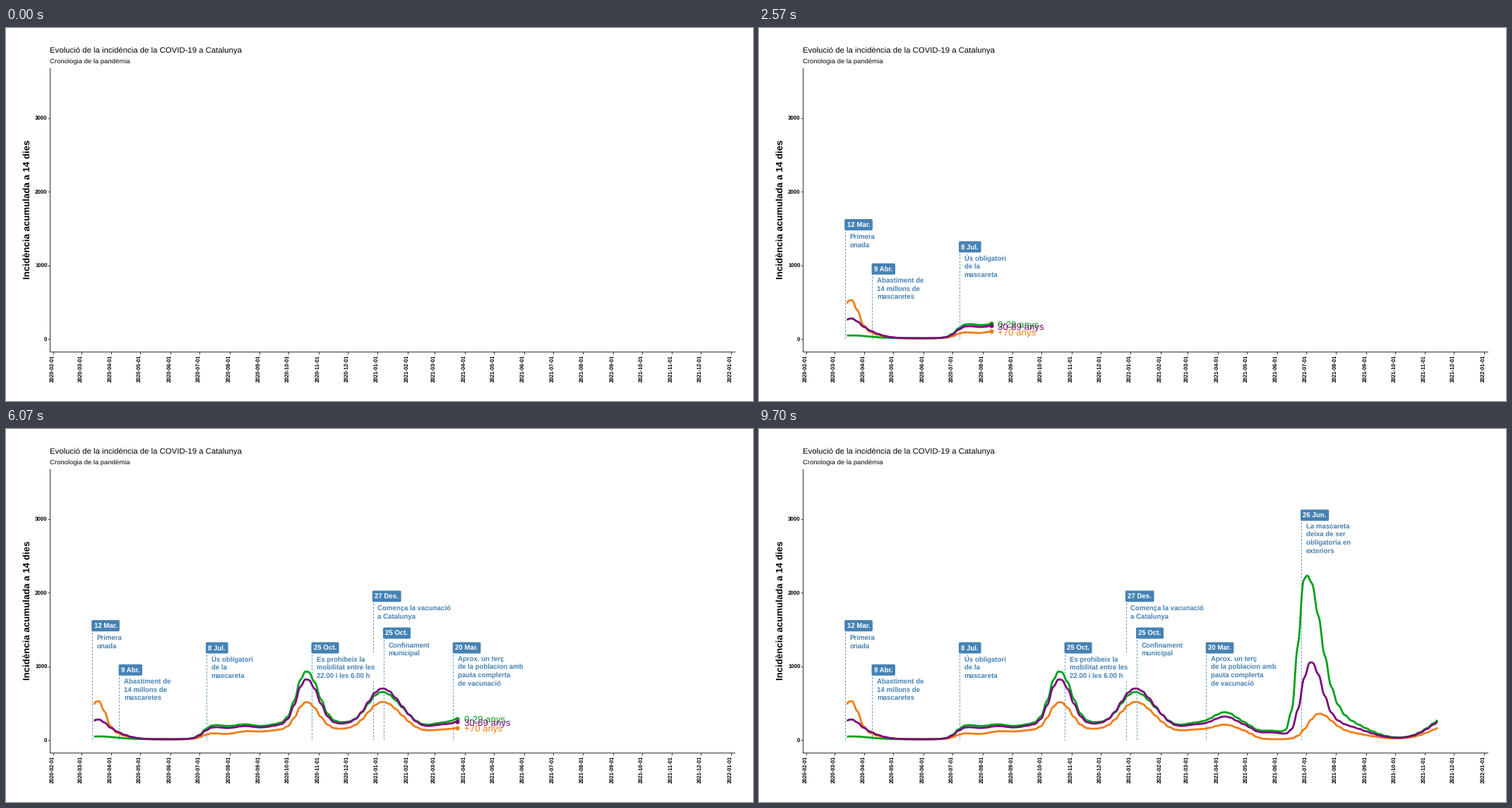
Recreate the animation shown at these times as a matplotlib script. Size 1058 px wide and 529 px high, loop 10000 ms.

```python
import matplotlib.pyplot as plt
import numpy as np
from matplotlib.animation import FuncAnimation
from matplotlib.patches import FancyBboxPatch, Rectangle

W, H, DPI = 1058, 529, 100
FRAMES, LOOP_MS = 300, 10000
PX = 72 / DPI  # points per pixel
BLUE, AXIS = "#4682B4", "#333333"
ZERO_Y, UNIT = 441, 0.1045
DAY0 = np.datetime64("2020-02-01")
DAY_PX = 960 / 700

plt.rcParams["font.family"] = "Liberation Sans"
plt.rcParams["text.hinting"] = "none"
fig = plt.figure(figsize=(W / DPI, H / DPI), dpi=DPI, facecolor="white")
ax = fig.add_axes([0, 0, 1, 1])
ax.set_xlim(0, W)
ax.set_ylim(H, 0)
ax.axis("off")


def date_x(day):
    return 67 + DAY_PX * (np.datetime64(day) - DAY0).astype(int)


def value_y(value):
    return ZERO_Y - UNIT * value


def put(x, y, text, size, color="black", **kw):
    return ax.text(x, y, text, fontsize=size * PX, color=color, **kw)


def rule(xs, ys, width=1.0, color=AXIS, **kw):
    return ax.plot(xs, ys, color=color, lw=width * PX, **kw)[0]


def text_width(text):
    return text.get_window_extent().width


def draw_axes():
    put(62.5, 34.5, "Evolució de la incidència de la COVID-19 a Catalunya", 11.38)
    put(62.5, 50, "Cronologia de la pandèmia", 9.48)
    put(31, 257.5, "Incidència acumulada a 14 dies", 13.25, weight="bold",
        rotation=90, ha="center", va="center")
    rule([62, 62], [56.5, 459])
    rule([62, 1032], [459, 459])
    for value in range(0, 4000, 1000):
        y = value_y(value)
        rule([60, 62], [y, y])
        put(58.5, y + 2.9, str(value), 7.9, weight="bold", ha="right")
    months = np.arange("2020-02", "2022-02", dtype="datetime64[M]")
    for day in months.astype("datetime64[D]"):
        x = date_x(day)
        rule([x, x], [459, 461.5])
        put(x - 1.5, 482.8, str(day), 7.55, weight="bold", rotation=90,
            ha="center", va="center")


EVENTS = [
    ("2020-03-12", "12 Mar.", 1550, "Primera\nonada"),
    ("2020-04-09", "9 Abr.", 950,
     "Abastiment de\n14 millons de\nmascaretes"),
    ("2020-07-08", "8 Jul.", 1250, "Ús obligatori\nde la\nmascareta"),
    ("2020-10-25", "25 Oct.", 1250,
     "Es prohibeix la\nmobilitat entre les\n22.00 i les 6.00 h"),
    ("2020-12-27", "27 Des.", 1950, "Comença la vacunació\na Catalunya"),
    ("2021-01-07", "25 Oct.", 1450, "Confinament\nmunicipal"),
    ("2021-03-20", "20 Mar.", 1250,
     "Aprox. un terç\nde la poblacion amb\npauta complerta\nde vacunació"),
    ("2021-06-26", "26 Jun.", 3050,
     "La mascareta\ndeixa de ser\nobligatoria en\nexteriors"),
]


def make_event(day, head, value, body):
    x, y = date_x(day), value_y(value)
    dash = rule([x, x], [y, ZERO_Y], 0.8, BLUE, dashes=(3.6, 2.4), zorder=1)

    lines = body.split("\n")
    first = y + 18.4 - 0.9 * len(lines)
    texts = [put(x + 6.9, first + 11.7 * i + 3.4, line, 9.65, BLUE,
                 weight="bold", zorder=3) for i, line in enumerate(lines)]
    wide = max(text_width(t) for t in texts)
    back = Rectangle((x + 3.5, first - 8), wide + 6.5, 11.7 * len(lines) + 4,
                     color="white", lw=0, zorder=2)

    title = put(x + 2.7, y + 3.5, head, 9.65, "white", weight="bold", zorder=3.5)
    box = FancyBboxPatch((x - 0.7, y - 8), text_width(title) + 7, 16,
                         boxstyle="round,pad=0,rounding_size=1.8",
                         fc=BLUE, ec="none", zorder=3.2)
    ax.add_patch(back)
    ax.add_patch(box)
    return x, [dash, back, box, title] + texts


# Each wave: centre, rise and fall width, then its height for
# +70, 0-29 and 30-69 (all in pixels)
WAVES = [
    (130, 12, 10, 40, 0, 10),      # first wave, sharp part
    (132, 20, 25, 14, 4, 18),      # and its tail
    (303, 18, 25, -4, 0, -1),      # slow start among the elderly
    (425, 14, 18, 40, 75, 66),     # autumn 2020
    (535, 23, 23, 41, 47, 54),     # winter
    (660, 22, 18, 8, 17, 13),      # spring 2021
    (725, 22, 25, 0, 12, 9.5),
    (774, 10.5, 22, 0, 210, 34),   # summer 2021, the young first
    (783, 12, 16, 2, 25, 76),
    (793, 15, 17, 33, 0, 0),
    (826, 17, 33, 10, 26, 19),
    (985, 30, 30, 22, 37, 34),     # next winter
]
PLATEAU = (12, 20, 18)
START, END = 124.7, 961.0
xs = np.linspace(START, END, 1700)


def sigmoid(z):
    return 1 / (1 + np.exp(-z))


def curve(age):
    # A weekly wobble gives the steep slopes their small steps
    x = xs + 0.9 * np.sin(2 * np.pi * (xs - START) / (7 * DAY_PX))
    level = PLATEAU[age] * sigmoid((x - 278) / 6) * sigmoid((698 - x) / 6)
    total = 1 + level * (1 + 0.06 * np.cos(2 * np.pi * (x - 338) / 46))
    for centre, rise, fall, *heights in WAVES:
        width = np.where(x < centre, rise, fall)
        total += heights[age] * np.exp(-0.5 * ((x - centre) / width) ** 2)
    return ZERO_Y - total


class Series:
    def __init__(self, age, name, color):
        self.ys = curve(age)
        self.line = rule([], [], 2.8, color, zorder=5, solid_capstyle="butt",
                         solid_joinstyle="round")
        self.dot = ax.plot([], [], "o", color=color, ms=6.2 * PX, mew=0,
                           zorder=6)[0]
        self.label = put(0, 0, name, 13.25, color, zorder=7)

    def reveal(self, x):
        n = np.searchsorted(xs, x)
        tip = np.interp(x, xs, self.ys)
        live = START <= x <= END
        self.line.set_data(np.append(xs[:n], min(x, END)) if n else [],
                           np.append(self.ys[:n], tip) if n else [])
        self.dot.set_data([x], [tip])
        self.label.set_position((x + 9.6, tip + 5))
        self.dot.set_visible(live)
        self.label.set_visible(live)


draw_axes()
events = [make_event(*event) for event in EVENTS]
series = [
    Series(0, "+70 anys", "#F07D14"),
    Series(1, "0-29 anys", "#00A11B"),
    Series(2, "30-69 anys", "#7B087B"),
]


def update(frame):
    x = 101.3 + 2.955 * frame
    for event_x, parts in events:
        for part in parts:
            part.set_visible(x >= event_x)
    for s in series:
        s.reveal(x)
    return []


anim = FuncAnimation(fig, update, frames=FRAMES, init_func=lambda: update(0),
                     interval=LOOP_MS / FRAMES, repeat=True, repeat_delay=0,
                     blit=False)
plt.show()
```
